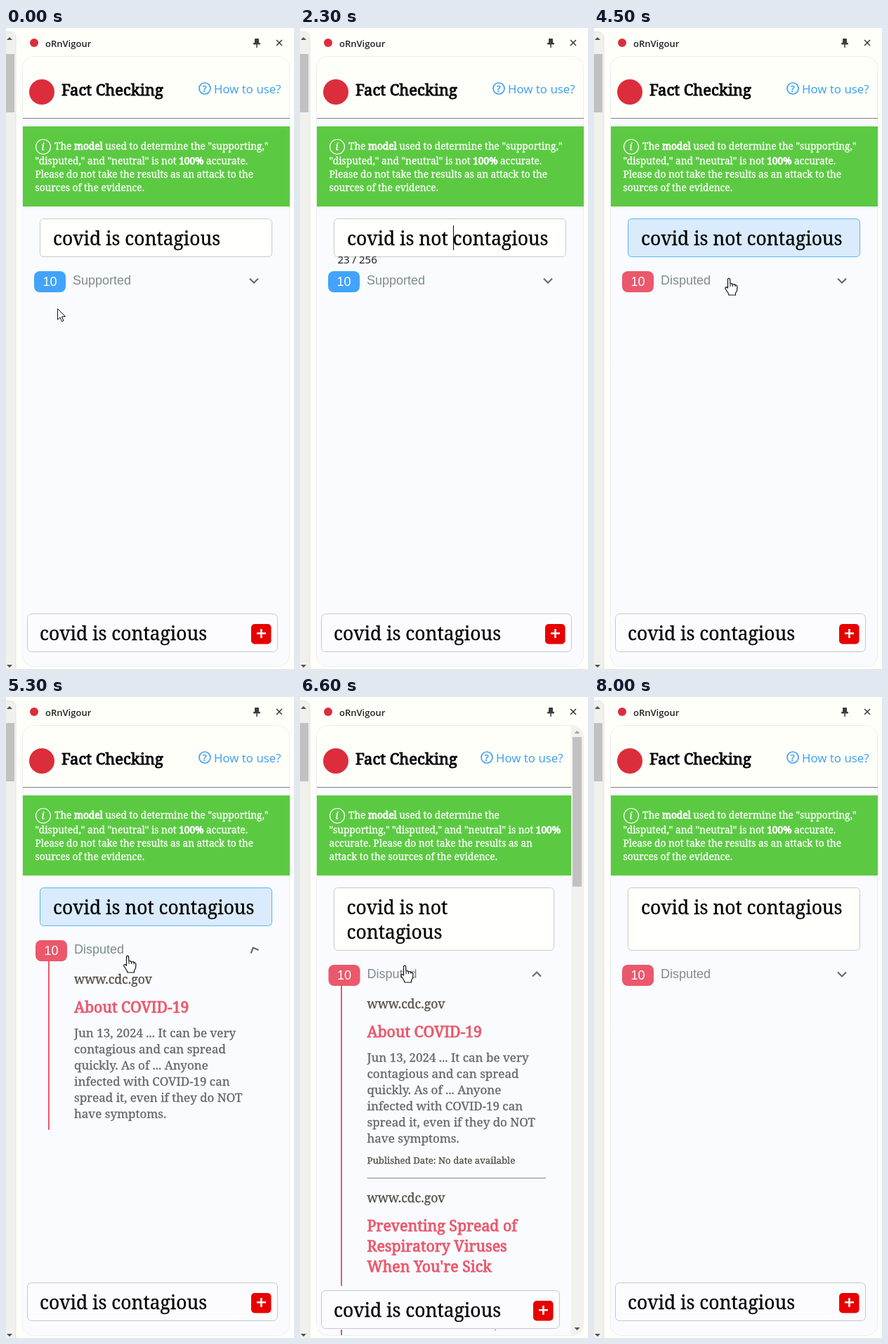
Write an HTML page with a canvas that moves like this. It is 410 px wide and 912 px high and loops after 8100 ms.

```html
<!DOCTYPE html>
<html lang="en">
<head>
<meta charset="utf-8">
<title>Fact Checking</title>
<style>
html, body { margin: 0; width: 410px; height: 912px; overflow: hidden; background: #fffffa; }
canvas { display: block; }
</style>
</head>
<body>
<canvas id="stage" width="410" height="912"></canvas>
<script>
const ctx = document.getElementById('stage').getContext('2d');
const LOOP = 8100, FULL = 2950;
const SLAB = '"Noto Serif", serif', SANS = '"Noto Sans", sans-serif', ARIAL = '"Liberation Sans", sans-serif';
const RED = '#eb586b', QUERY = 26.4, VIEW = 868;
const OPEN = 5209, CLOSE = 6905;

// Pointer keyframes: time, x, y
const path = [[0, 73, 399], [300, 78, 396], [900, 132, 350], [1200, 163, 321], [1500, 169, 306],
  [3250, 169, 306], [3400, 209, 353], [3700, 209, 353], [4600, 190, 356], [5000, 174, 366],
  [5300, 173, 368], [5800, 206, 370], [6300, 190, 372], [6820, 120, 390], [7000, 74, 307], [7500, 52, 294]];

const items = [
  { title: ['About COVID-19'], date: 'Published Date: No date available',
    body: ['Jun 13, 2024 ... It can be very', 'contagious and can spread', 'quickly. As of ... Anyone',
      'infected with COVID-19 can', 'spread it, even if they do NOT', 'have symptoms.'] },
  { title: ['Preventing Spread of', 'Respiratory Viruses', "When You're Sick"],
    body: ['Mar 1, 2024 ... . Stay home and', 'away from others (including', 'those who are not sick) if',
      'you have symptoms of', 'a respiratory virus infection'] }
];
const wideNote = ['The *model* used to determine the "supporting,"',
  '"disputed," and "neutral" is not *100%* accurate.',
  'Please do not take the results as an attack to the', 'sources of the evidence.'];
const narrowNote = ['The *model* used to determine the', '"supporting," "disputed," and "neutral" is not *100%*',
  'accurate. Please do not take the results as an', 'attack to the sources of the evidence.'];

const swing = p => 0.5 - Math.cos(Math.PI * Math.min(1, Math.max(0, p))) / 2;

function text(str, x, y, size, color, family = SLAB, heavy = family === SLAB ? 0.3 : 0, style = '') {
  ctx.font = `${style} ${size}px ${family}`;
  ctx.fillStyle = ctx.strokeStyle = color;
  ctx.fillText(str, x, y);
  if (heavy) { ctx.lineWidth = heavy; ctx.strokeText(str, x, y); }
  return ctx.measureText(str).width;
}
function rich(str, x, y, size, color) {
  str.split('*').forEach((part, i) => x += text(part, x, y, size, color, SLAB, i % 2 ? 0.9 : 0.3));
}
function rect(x, y, w, h, fill, r = 0, border) {
  ctx.beginPath();
  ctx.roundRect(x, y, w, h, r);
  if (fill) { ctx.fillStyle = fill; ctx.fill(); }
  if (border) { ctx.strokeStyle = border; ctx.lineWidth = 1; ctx.stroke(); }
}
function line(points, color, width = 1, closed = false, fill) {
  ctx.beginPath();
  points.forEach(p => ctx.lineTo(...p));
  if (closed) ctx.closePath();
  if (fill) { ctx.fillStyle = fill; ctx.fill(); }
  if (color) { ctx.strokeStyle = color; ctx.lineWidth = width; ctx.stroke(); }
}
function disc(x, y, r, fill, stroke, width = 1) {
  ctx.beginPath();
  ctx.arc(x, y, r, 0, 7);
  if (fill) { ctx.fillStyle = fill; ctx.fill(); }
  if (stroke) { ctx.strokeStyle = stroke; ctx.lineWidth = width; ctx.stroke(); }
}
function triangle(x, y, dir, color) {
  line([[x - 4, y + 2 * dir], [x + 4, y + 2 * dir], [x, y - 2 * dir]], null, 0, true, color);
}
function clipped(x, y, w, h, draw) {
  ctx.save();
  ctx.beginPath();
  ctx.rect(x, y, w, h);
  ctx.clip();
  draw();
  ctx.restore();
}

function drawWindow() {
  rect(0, 0, 410, 912, '#fffffa');
  rect(-10, 5.5, 24, 920, '#f0f0ec', 8, '#e2e2df');
  rect(0, 37, 12, 83, '#c1c1c1');
  triangle(5, 15, 1, '#505050');
  triangle(5, 908, -1, '#505050');
  disc(40, 21, 6, '#dc2d3c');
  text('oRnVigour', 56, 27, 13, '#222', '"Open Sans", sans-serif', 0, '600');
  rect(354, 15, 6, 7, '#3c3c3c', 1);
  rect(352, 21, 10, 2.5, '#3c3c3c', 1);
  rect(356.3, 23, 1.5, 5, '#3c3c3c');
  line([[385, 17], [393, 25]], '#333', 1.4);
  line([[393, 17], [385, 25]], '#333', 1.4);
}

function drawHeader(s) {
  const width = s.right - 24, dx = s.scroll ? -17 : 0;
  rect(23.5, 40.5, 380, 868, '#f9fbff', 16, '#ecedf2');
  rect(24, 41, 379, 87, '#fffffa', [16, 16, 0, 0]);
  rect(24, 128, width, 1, '#808080');
  disc(51, 91, 18, '#dc2d3c');
  text('Fact Checking', 79, 96, 22, '#000', SLAB, 0.9);
  disc(283 + dx, 86, 8, null, '#43a2f2', 1.7);
  text('?', 280 + dx, 91, 13, '#43a2f2', SANS, 0.5);
  text('How to use?', 296 + dx, 93, 16.8, '#43a2f2', SANS);

  rect(24, 140, width, 114, '#5bca42');
  disc(53, 169, 10.5, null, '#fff', 1.2);
  text('i', 50.3, 174, 15, '#fff', SLAB, 0.3, 'italic');
  (s.scroll ? narrowNote : wideNote).forEach((str, i) =>
    rich(str, i ? 41.5 : 69, [173, 194, 213, 232][i], 13.7, '#fff'));
}

function drawQuery(t, s) {
  const w = s.scroll ? 314 : 331, h = s.tall ? 90 : 55;
  rect(48.5, 271.5, w - 1, h - 1, s.busy ? '#d9ebfc' : '#fffffc', 5, s.busy ? '#5cb4ee' : '#c8c8c8');
  const typed = 'not '.slice(0, t < 1700 ? 0 : Math.floor((t - 1600) / 100));
  const head = 'covid is ' + typed;
  clipped(49, 272, w - 2, h - 2, () => {
    if (s.scroll) {
      text('covid is not', 66.5, 309, QUERY, '#000');
      text('contagious', 66.5, 344, QUERY, '#000');
    } else text(head + 'contagious', 67, 309, QUERY, '#000');
  });
  if (t >= 1600 && t < 3700) {
    text(19 + typed.length + ' / 256', 53.5, 335, 15, '#222', SANS);
    ctx.font = `${QUERY}px ${SLAB}`;
    if (t < 2500 || t >= 3000) rect(Math.round(67 + ctx.measureText(head).width), 281, 1, 35, '#000');
  }
}

function drawItem(item, x, y, right) {
  text('www.cdc.gov', x, y, 17.6, '#544f45');
  item.title.forEach((s, i) => text(s, x, y + 41 + 29 * i, 21.3, RED, SLAB, 0.9));
  const top = y + 76 + 29 * (item.title.length - 1);
  item.body.forEach((s, i) => text(s, x, top + 23 * i, 17, '#62656a'));
  if (item.date) {
    text(item.date, x, y + 221, 13.2, '#544f45');
    rect(x, y + 241, right - x, 1, '#858585');
  }
}

function drawResults(t, s) {
  const dy = s.tall ? 35 : 0;
  const x = (s.scroll ? 38.5 : 40) + (s.open ? 2 : 0);
  const disputed = t >= 4200;
  if (s.reveal > 0) clipped(24, 376 + dy, s.right - 24, s.reveal, () => {
    if (s.open) rect(Math.floor(x + 18), 376, 2, 540, RED);
    items.forEach((item, i) => drawItem(item, x + 55, 408 + dy + 276 * i, 350));
  });
  rect(x, 346 + dy, 45, 30, disputed ? RED : '#42a3fa', 8);
  text('10', x + 12.5, 367 + dy, 18, '#fff', ARIAL);
  text(disputed ? 'Disputed' : 'Supported', x + 55, 365 + dy, 18, '#7d8b90', ARIAL);
  ctx.save();
  ctx.translate(s.scroll ? 337 : 353, 359.5 + dy);
  ctx.rotate(Math.PI * (swing((t - OPEN) / 120) - swing((t - CLOSE + 25) / 120)));
  line([[-6, -3], [0, 3], [6, -3]], '#6a6a6a', 2.2);
  ctx.restore();
}

function drawFooter(s) {
  const y = s.scroll ? (s.tall ? 844 : 843) : 833, w = s.scroll ? 340 : 357;
  if (s.scroll) rect(24, 838, s.right - 24, 62, '#f9fbff');
  rect(30.5, y + 0.5, w - 1, 54, '#fcfcff', 6, '#c8c8c8');
  text('covid is contagious', 48, y + 38, QUERY, '#000');
  const bx = w - 8;
  rect(bx, y + 15, 28.5, 28.5, '#e60000', 5);
  rect(bx + 8, y + 27, 13, 2.5, '#fff');
  rect(bx + 13.2, y + 22, 2.5, 13, '#fff');
}

function drawScrollbar(s) {
  rect(386, 41, 17, 867, '#f1f1ee', [0, 16, 16, 0]);
  rect(388, 57, 13, 836 * VIEW / s.total, '#c1c1c1');
  triangle(394.5, 50, 1, '#a3a3a3');
  triangle(394.5, 899, -1, '#505050');
}

function drawPointer(t, s) {
  if (t >= 7500 || (t >= 1700 && t < 3250)) return;
  const i = path.findIndex((p, n) => path[n + 1][0] > t);
  const [t0, x0, y0] = path[i], [t1, x1, y1] = path[i + 1];
  const p = (t - t0) / (t1 - t0), x = x0 + (x1 - x0) * p, y = y0 + (y1 - y0) * p;
  const boxEnd = s.tall ? 361 : 326;
  ctx.save();
  ctx.translate(Math.round(x), Math.round(y));
  if (x > 48 && y > 271 && y < boxEnd) {
    line([[-3, -7.5], [4, -7.5]], '#222');
    line([[0.5, -7], [0.5, 8]], '#222');
    line([[-3, 8.5], [4, 8.5]], '#222');
  } else if (y > boxEnd + 18 && y < boxEnd + 58) {
    ctx.lineJoin = 'round';
    line([[-1.5, 1], [0, 0], [1.5, 1], [2, 8], [4, 7.5], [5.5, 9], [8, 8.5], [9, 10], [11, 10], [12, 12],
      [11.5, 18], [9.5, 21], [9.5, 24], [0, 24], [-1, 21], [-5, 15], [-5, 13], [-3.5, 12.5], [-1.5, 14]],
      '#111', 1.2, true, '#fff');
    for (const fx of [2, 5.5, 9]) line([[fx, 8.5], [fx, 12]], '#111');
  } else {
    line([[0.5, 0.5], [0.5, 16], [4, 12.7], [6.5, 18.5], [9, 17.5], [6.5, 11.8], [11.5, 11.5]],
      '#111', 1, true, '#fff');
  }
  ctx.restore();
}

function frame(now) {
  const t = now % LOOP;
  const tall = t >= 6400;
  const reveal = FULL * (swing((t - OPEN) / 500) - swing((t - CLOSE) / 500));
  const total = 425 + reveal + (tall ? 35 : 0);
  const scroll = total > VIEW;
  const s = { tall, reveal, total, scroll, right: scroll ? 386 : 404,
    open: t >= OPEN && t < CLOSE - 25, busy: t >= 3700 && t < 6400 };
  drawWindow();
  drawHeader(s);
  clipped(24, 254, 379, 654, () => {
    drawResults(t, s);
    drawQuery(t, s);
    drawFooter(s);
  });
  if (scroll) drawScrollbar(s);
  drawPointer(t, s);
  requestAnimationFrame(frame);
}
requestAnimationFrame(frame);
</script>
</body>
</html>
```
